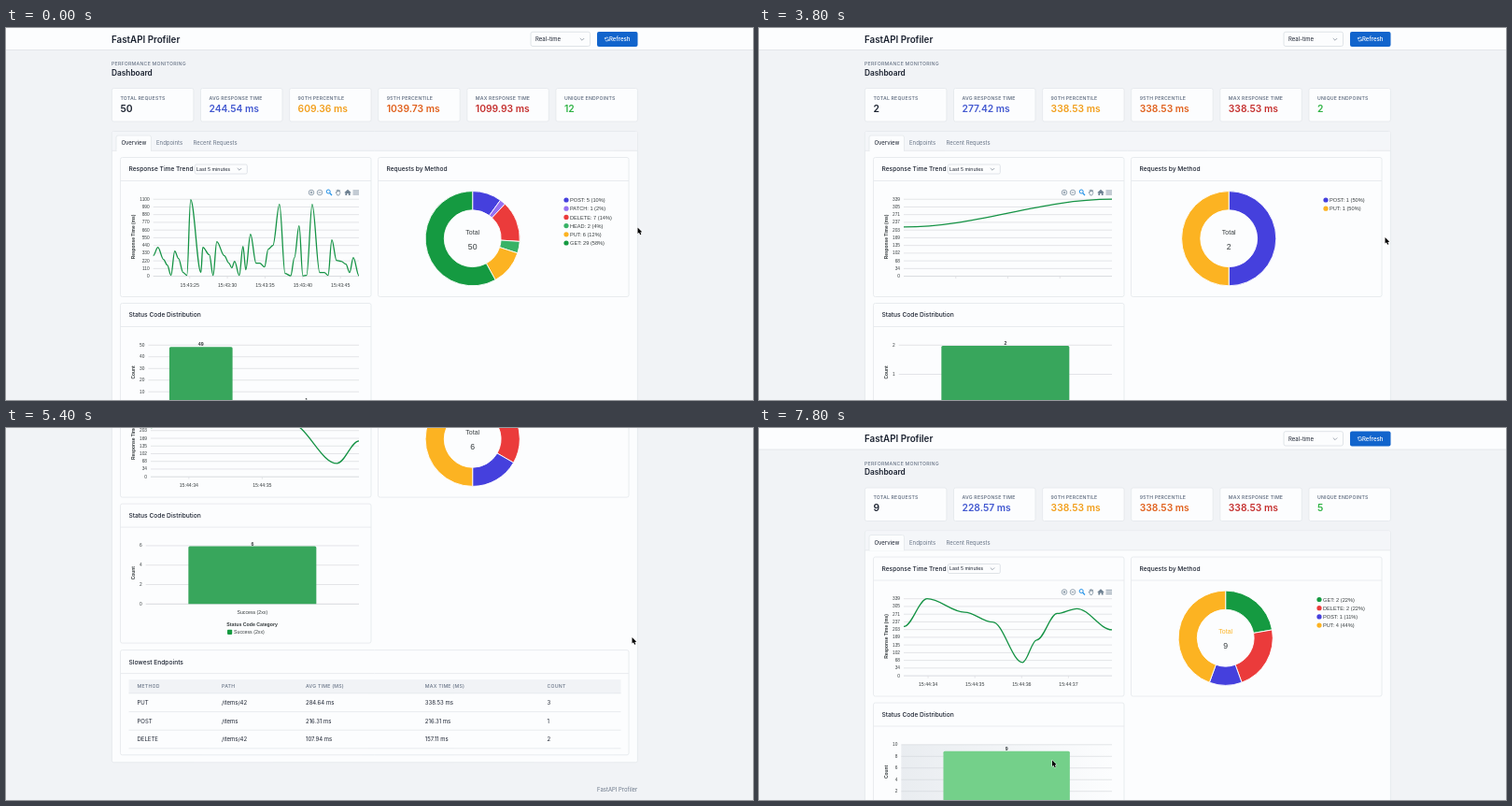
Recreate the animation shown at these times as an HTML page with a canvas. Size 800 by 398 pixels, loop 8 s.

```html
<!DOCTYPE html>
<html lang="en">
<head>
<meta charset="utf-8">
<title>FastAPI Profiler</title>
<style>
  html, body { margin: 0; width: 100%; height: 100%; overflow: hidden; background: #f1f3f6; }
  canvas { display: block; width: 800px; height: 398px; }
</style>
</head>
<body>
<canvas id="stage"></canvas>
<script>
const LOOP = 8000, STEP = 200;
const UI = 'Inter, sans-serif', CHART = '"Liberation Sans", Arial, sans-serif';
const INK = '#1b2230', MUTED = '#6b7789', LABEL = '#373d3f';
const WHITE = '#fcfdfe', PAGE = '#f1f3f6', BORDER = '#e4e7eb', GRID = '#dddfe3';
const METHOD_COLORS = {
  GET: '#159a41', DELETE: '#eb3b3b', POST: '#4540dd',
  PUT: '#fcb322', PATCH: '#9671f2', HEAD: '#38b266'
};

const canvas = document.getElementById('stage');
const ctx = canvas.getContext('2d');
const ratio = window.devicePixelRatio || 1;
canvas.width = 800 * ratio;
canvas.height = 398 * ratio;

// seconds since first request, method, path, duration in ms
const samples = [
  [0, 'POST', '/items', 216.31], [0.5, 'PUT', '/items/42', 338.53],
  [1.3, 'PUT', '/items/42', 279.6], [1.9, 'PUT', '/items/42', 235.79],
  [2.54, 'DELETE', '/items/42', 58.77], [2.84, 'DELETE', '/items/42', 157.11],
  [3.28, 'GET', '/medium', 273.76], [3.7, 'PUT', '/items/42', 295.04],
  [4.45, 'GET', '/users', 202.22]
];

// x offset and height in pixels of the busy opening trend
const busyTrend = [
  [0, 22], [5, 31], [11, 18], [15, 12], [19, 1], [23, 27], [27, 19], [32, 4], [36, 1],
  [40, 82], [51, 4], [53, 31], [60, 23], [64, 1], [68, 37], [76, 22], [81, 14],
  [84, 9], [87, 16], [92, 1], [96, 32], [99, 7], [104, 45], [110, 14], [114, 14], [119, 10],
  [123, 29], [128, 33], [135, 77], [141, 3], [147, 0.5], [151, 20], [156, 54], [160, 0.5],
  [164, 1], [170, 77], [178, 4], [183, 4], [187, 1], [191, 39], [196, 17], [201, 16],
  [206, 13], [210, 4], [214, 20], [220, 0.5]
];

const busyState = {
  total: 50, times: [244.54, 609.36, 1039.73, 1099.93], endpoints: 12,
  methods: [['POST', 5], ['PATCH', 1], ['DELETE', 7], ['HEAD', 2], ['PUT', 6], ['GET', 29]],
  codes: [49, 1], codeMax: 50, codeStep: 10, rows: [],
  trend: busyTrend.map(([x, h]) => [x, h * 1100 / 82.5]), trendMax: 1100,
  ticks: [0, 1, 2, 3, 4].map(i => [39 + 40.3 * i, '15:43:' + (25 + 5 * i)])
};

function liveState(count) {
  const seen = samples.slice(0, count);
  const durations = seen.map(s => s[3]);
  const max = Math.max(0, ...durations);
  const avg = durations.reduce((a, b) => a + b, 0) / (count || 1);
  const groups = new Map();
  for (const [, method, path, ms] of seen) {
    const key = method + path;
    if (!groups.has(key)) groups.set(key, { method, path, sum: 0, max: 0, count: 0 });
    const g = groups.get(key);
    g.sum += ms;
    g.max = Math.max(g.max, ms);
    g.count++;
  }
  const end = count ? seen[count - 1][0] : 0;
  const ticks = [];
  for (let k = 0; k + 0.52 < end - 0.3; k++) {
    if (end - k - 0.52 > 0.5) ticks.push([k + 0.52, '15:44:' + (34 + k)]);
  }
  const codeStep = count > 4 ? 2 : 1;
  return {
    total: count, times: [avg, max, max, max], endpoints: groups.size,
    methods: ['GET', 'DELETE', 'POST', 'PUT']
      .map(m => [m, seen.filter(s => s[1] === m).length]).filter(m => m[1]),
    codes: count ? [count] : [], codeStep,
    codeMax: count ? Math.ceil(count / codeStep) * codeStep : 5,
    rows: [...groups.values()].sort((a, b) => b.sum / b.count - a.sum / a.count),
    trend: seen.map(s => [s[0], s[3]]), trendMax: max, ticks
  };
}

const timeline = [
  [0, busyState], [800, liveState(0)], [3200, liveState(2)], [4200, liveState(4)],
  [5200, liveState(6)], [6200, liveState(8)], [7200, liveState(9)]
];
const scrollKeys = [
  [3800, 0], [4200, 45], [4600, 138.6], [5000, 195], [5400, 213.4], [6200, 213.4],
  [6400, 208], [6800, 90], [7200, 6], [7800, 0.5]
];
const cursorKeys = [
  [0, 676.5, 213.5], [600, 660, 12], [1200, 660, 12], [2400, 716, 152], [2800, 765, 120],
  [3600, 670.5, 224], [6000, 670.5, 224], [6400, 521, 217.5], [7000, 462, 236],
  [7400, 335, 338], [7800, 314, 355.5]
];

function along(keys, t) {
  const i = keys.findIndex(k => k[0] > t);
  if (i === 0) return keys[0].slice(1);
  if (i < 0) return keys[keys.length - 1].slice(1);
  const a = keys[i - 1], b = keys[i], p = (t - a[0]) / (b[0] - a[0]);
  return a.slice(1).map((v, j) => v + (b[j + 1] - v) * p);
}

// y is the middle of the capital letters
function text(str, x, y, size, { color = INK, weight = 400, family = UI, align = 'left', spacing = 0 } = {}) {
  ctx.font = `${weight} ${size}px ${family}`;
  ctx.letterSpacing = spacing * size + 'px';
  ctx.textAlign = align;
  ctx.fillStyle = color;
  ctx.fillText(str, x, y + size * 0.36);
}
const chartText = (str, x, y, size, style) =>
  text(str, x, y, size, { family: CHART, color: LABEL, ...style });

function box(x, y, w, h, { fill = WHITE, stroke = BORDER, radius = 2 } = {}) {
  ctx.beginPath();
  ctx.roundRect(x, y, w, h, radius);
  ctx.fillStyle = fill;
  ctx.fill();
  if (stroke) {
    ctx.strokeStyle = stroke;
    ctx.lineWidth = 0.8;
    ctx.stroke();
  }
}

function path(points, color, width = 0.8) {
  ctx.beginPath();
  points.forEach(([x, y]) => ctx.lineTo(x, y));
  ctx.strokeStyle = color;
  ctx.lineWidth = width;
  ctx.stroke();
}
const rule = (x1, x2, y, color = BORDER) => path([[x1, y], [x2, y]], color);
const chevron = (x, y) => path([[x - 2.2, y - 1], [x, y + 1.2], [x + 2.2, y - 1]], '#7c8693', 0.7);

function disc(x, y, r, color) {
  ctx.beginPath();
  ctx.arc(x, y, r, 0, Math.PI * 2);
  ctx.fillStyle = color;
  ctx.fill();
}

function ring(x, y, r, color, width = 0.7) {
  ctx.beginPath();
  ctx.arc(x, y, r, 0, Math.PI * 2);
  ctx.strokeStyle = color;
  ctx.lineWidth = width;
  ctx.stroke();
}

function chartCard(title, x, y, w, h) {
  box(x, y, w, h);
  rule(x, x + w, y + 25);
  text(title, x + 9, y + 12.6, 6.65, { weight: 500 });
}

function axisTitle(str, y) {
  ctx.save();
  ctx.translate(136, y);
  ctx.rotate(-Math.PI / 2);
  chartText(str, 0, 0, 4.9, { weight: 700, align: 'center' });
  ctx.restore();
}

// Draws grid lines with labels and returns the left edge of the plot.
function yAxis(labels, top, bottom) {
  const left = 147 + 2.67 * String(labels[labels.length - 1]).length;
  labels.forEach((label, i) => {
    const y = bottom - (bottom - top) * i / (labels.length - 1);
    rule(left, 378, y, i ? GRID : '#cfd2d7');
    chartText(label, left - 4, y - 0.2, 4.8, { align: 'right' });
  });
  return left;
}

function header() {
  ctx.fillStyle = WHITE;
  ctx.fillRect(0, 0, 800, 23.5);
  rule(0, 800, 23.5, '#dfe2e6');
  text('FastAPI Profiler', 113, 12.2, 9.8, { weight: 600 });
  box(562, 4.2, 63.5, 15.3, { stroke: '#d9dde2' });
  text('Real-time', 567, 12, 6);
  chevron(617, 12);
  box(633, 4, 43.5, 16, { fill: '#1164cc', stroke: null });
  for (const start of [0.4, 3.54]) {
    ctx.beginPath();
    ctx.arc(643.5, 12, 2, start, start + 2.3);
    ctx.strokeStyle = '#fff';
    ctx.lineWidth = 0.7;
    ctx.stroke();
  }
  path([[641.4, 10], [641.4, 11.6], [643, 11.6]], '#fff', 0.6);
  path([[645.6, 14], [645.6, 12.4], [644, 12.4]], '#fff', 0.6);
  text('Refresh', 646, 12, 6.1, { weight: 500, color: '#fff' });
  text('PERFORMANCE MONITORING', 113, 38.2, 5.22, { weight: 500, color: MUTED, spacing: 0.04 });
  text('Dashboard', 113, 47.8, 8.3, { weight: 600 });
}

function statCards(state) {
  const ms = state.times.map(v => v.toFixed(2) + ' ms');
  const cards = [
    ['TOTAL REQUESTS', state.total, INK], ['AVG RESPONSE TIME', ms[0], '#4258d0'],
    ['90TH PERCENTILE', ms[1], '#f29f1c'], ['95TH PERCENTILE', ms[2], '#e0601c'],
    ['MAX RESPONSE TIME', ms[3], '#c5302f'], ['UNIQUE ENDPOINTS', state.endpoints, '#2fb344']
  ];
  cards.forEach(([label, value, color], i) => {
    const x = 113.4 + 95.1 * i;
    box(x, 64.5, 87.5, 35.5);
    text(label, x + 9, 75, 5.15, { weight: 600, color: MUTED, spacing: 0.04 });
    text(value, x + 9, 86.2, 10.3, { weight: 600, color });
  });
}

function panel(bottom) {
  box(113.4, 110.5, 563, bottom - 110.5);
  ctx.fillStyle = '#f4f6f9';
  ctx.fillRect(113.9, 111, 562, 20.3);
  rule(113.4, 676.4, 131.3);
  box(118, 115, 37.5, 16.3, { radius: [2, 2, 0, 0] });
  ctx.fillStyle = WHITE;
  ctx.fillRect(118.5, 130, 36.5, 2);
  text('Overview', 123.5, 123.2, 6);
  text('Endpoints', 161, 123.2, 6, { color: MUTED });
  text('Recent Requests', 200.5, 123.2, 5.95, { color: MUTED });
}

function toolbar() {
  const gray = '#6e8192';
  ring(327, 176, 2.8, gray);
  ring(336, 176, 2.8, gray);
  rule(325.6, 328.4, 176, gray);
  path([[327, 174.6], [327, 177.4]], gray);
  rule(334.6, 337.4, 176, gray);
  ring(345.2, 175, 2, '#2492e8', 1);
  path([[346.6, 176.5], [349, 179]], '#2492e8', 1.2);
  path([[354.2, 177.5], [353, 175.8], [354.4, 176], [354.2, 173.4], [355.4, 175], [355.7, 172.8],
    [356.5, 175], [357.2, 173.4], [357.8, 176.5], [356.6, 179], [354.8, 179], [354.2, 177.5]], gray, 0.7);
  ctx.fillStyle = gray;
  ctx.beginPath();
  [[362.2, 176.2], [366, 172.8], [369.8, 176.2], [368.6, 176.2], [368.6, 179], [366.8, 179],
    [366.8, 177], [365.2, 177], [365.2, 179], [363.4, 179], [363.4, 176.2]].forEach(p => ctx.lineTo(...p));
  ctx.fill();
  for (const y of [174, 176, 178]) rule(371.5, 378, y, gray);
}

function trendChart({ trend, trendMax, ticks }) {
  const top = 183.2, bottom = 265.6;
  chartCard('Response Time Trend', 122.5, 138.5, 268.5, 149);
  box(202.3, 146, 56, 10, { stroke: '#d9dde2', radius: 1.5 });
  text('Last 5 minutes', 204, 151, 5.25);
  chevron(250, 151);
  axisTitle('Response Time (ms)', 223.5);
  const count = trend.length ? 10 : 5;
  const labels = Array.from({ length: count + 1 }, (_, i) => Math.round((trendMax || 5) * i / count));
  const left = yAxis(labels, top, bottom);
  if (!ticks.length) {
    for (let i = 1; i < 4; i++) {
      const x = left + (378 - left) * i / 4;
      path([[x, bottom], [x, bottom + 2.5]], GRID);
    }
  }
  if (!trend.length) return;
  toolbar();
  const end = trend[trend.length - 1][0];
  const toX = v => left + v / end * (378 - left);
  const toY = v => bottom - v / trendMax * (bottom - top);
  for (const [at, label] of ticks) {
    path([[toX(at), bottom], [toX(at), bottom + 2.5]], GRID);
    chartText(label, toX(at), 274.8, 5.22, { align: 'center' });
  }
  ctx.beginPath();
  trend.forEach(([at, value], i) => {
    const x = toX(at), y = toY(value);
    if (!i) return ctx.moveTo(x, y);
    const px = toX(trend[i - 1][0]), bend = (x - px) * 0.35;
    ctx.bezierCurveTo(px + bend, toY(trend[i - 1][1]), x - bend, y, x, y);
  });
  ctx.strokeStyle = '#159345';
  ctx.lineWidth = 1.3;
  ctx.lineJoin = 'round';
  ctx.stroke();
}

function methodChart({ methods, total }, hovered) {
  chartCard('Requests by Method', 398.5, 138.5, 268.5, 149);
  if (!total) return;
  const wide = methods.some(m => m[0] === 'DELETE');
  const cx = wide ? 499.7 : 503.2, cy = 225.2, legendX = wide ? 600 : 607;
  let angle = -Math.PI / 2;
  methods.forEach(([name, count], i) => {
    const next = angle + count / total * Math.PI * 2;
    ctx.beginPath();
    ctx.arc(cx, cy, 50.6, angle, next);
    ctx.arc(cx, cy, 30.4, next, angle, true);
    ctx.closePath();
    ctx.fillStyle = METHOD_COLORS[name];
    ctx.fill();
    ctx.strokeStyle = '#fff';
    ctx.lineWidth = 0.9;
    ctx.stroke();
    angle = next;
    const y = 184 + 9.2 * i;
    disc(legendX, y, 2.6, METHOD_COLORS[name]);
    chartText(`${name}: ${count} (${Math.round(count / total * 100)}%)`, legendX + 4, y + 0.2, 5.65);
  });
  chartText('Total', cx, 218.2, 6.96, { align: 'center', color: hovered ? METHOD_COLORS.PUT : LABEL });
  chartText(total, cx, 233.7, 8.7, { align: 'center' });
}

function statusChart({ codes, codeMax, codeStep }, hovered) {
  const top = 339.3, bottom = codes.length ? 401.7 : 408.6;
  chartCard('Status Code Distribution', 122.5, 294.5, 268.5, 149);
  axisTitle('Count', 368.5);
  const labels = [];
  for (let v = 0; v <= codeMax; v += codeStep) labels.push(v);
  const left = yAxis(labels, top, bottom);
  if (!codes.length) return;
  const slot = (378 - left) / codes.length;
  if (hovered) {
    const shade = ctx.createLinearGradient(left, 0, 378, 0);
    shade.addColorStop(0, 'rgba(205,212,220,.4)');
    shade.addColorStop(1, 'rgba(205,212,220,0)');
    ctx.fillStyle = shade;
    ctx.fillRect(left, top, 378 - left, bottom - top);
  }
  codes.forEach((count, i) => {
    const cx = left + slot * (i + 0.5), width = slot * 0.6;
    const y = bottom - count / codeMax * (bottom - top) + 0.6;
    const fill = i ? '#fcb322' : hovered ? '#74d08a' : '#38a65c';
    box(cx - width / 2, y, width, bottom - y, { fill, stroke: null, radius: [1.5, 1.5, 0, 0] });
    chartText(count, cx, y - 2.7, 5.22, { weight: 700, align: 'center' });
    chartText(i ? 'Client Error (4xx)' : 'Success (2xx)', cx, 410.8, 5.22, { align: 'center' });
  });
  chartText('Status Code Category', 263.6, 423.7, 5.22, { weight: 700, align: 'center' });
  box(237, 429.1, 5.2, 5.2, { fill: '#159a41', stroke: null, radius: 0.8 });
  chartText('Success (2xx)', 244, 431.8, 5.22);
}

function slowestTable(rows, height) {
  const columns = [140.5, 231, 321, 448.8, 579.5];
  chartCard('Slowest Endpoints', 122.5, 451, 544.5, height);
  ctx.fillStyle = PAGE;
  ctx.fillRect(131.5, 482.6, 527, 14.6);
  rule(131.5, 658.5, 497.2);
  ['METHOD', 'PATH', 'AVG TIME (MS)', 'MAX TIME (MS)', 'COUNT'].forEach((label, i) =>
    text(label, columns[i], 489.8, 5.22, { weight: 500, color: MUTED, spacing: 0.04 }));
  rows.forEach(({ method, path, sum, max, count }, i) => {
    const y = 507.3 + 19.6 * i;
    const cells = [method, path, (sum / count).toFixed(2) + ' ms', max.toFixed(2) + ' ms', count];
    cells.forEach((cell, j) => text(cell, columns[j], y, 6));
    rule(131.5, 658.5, y + 9.7);
  });
}

function cursor(x, y) {
  ctx.beginPath();
  [[0, 0], [0, 6.6], [1.5, 5.3], [2.6, 7.7], [3.8, 7.2], [2.8, 4.9], [4.7, 4.8]]
    .forEach(([dx, dy]) => ctx.lineTo(x + dx, y + dy));
  ctx.closePath();
  ctx.strokeStyle = '#fff';
  ctx.lineWidth = 1;
  ctx.stroke();
  ctx.fillStyle = '#000';
  ctx.fill();
}

function render(now) {
  const t = Math.floor(now % LOOP / STEP) * STEP;
  const state = timeline.filter(k => k[0] <= t).pop()[1];
  const [scroll] = along(scrollKeys, t);
  const tableHeight = 53.4 + 19.6 * state.rows.length;
  const panelBottom = 459 + tableHeight;
  ctx.setTransform(ratio, 0, 0, ratio, 0, 0);
  ctx.fillStyle = PAGE;
  ctx.fillRect(0, 0, 800, 398);
  ctx.save();
  ctx.translate(0, -scroll);
  header();
  statCards(state);
  panel(panelBottom);
  trendChart(state);
  methodChart(state, t >= 7000);
  statusChart(state, t >= 7400);
  slowestTable(state.rows, tableHeight);
  text('FastAPI Profiler', 676.3, panelBottom + 29, 5.95, { color: MUTED, align: 'right' });
  ctx.restore();
  cursor(...along(cursorKeys, t));
}

const begin = performance.now();
function tick() {
  render(performance.now() - begin);
  requestAnimationFrame(tick);
}
tick();
</script>
</body>
</html>
```
